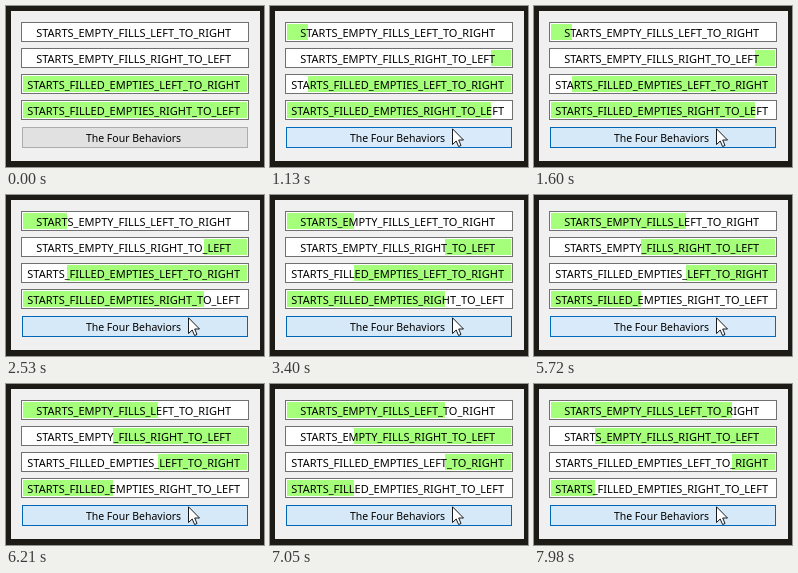
An HTML page for the animation above (8 s loop, 258 by 161 pixels).

```html
<!DOCTYPE html>
<html lang="en">
<head>
<meta charset="utf-8">
<title>The Four Behaviors</title>
<style>
html, body { margin: 0; width: 100%; height: 100%; overflow: hidden; background: #1d1b16; }
svg { display: block; width: 258px; height: 161px; }
text { font: 11px "Noto Sans", "Open Sans", sans-serif; text-anchor: middle; fill: #000; }
.label { font-size: 10.5px; }
</style>
</head>
<body>
<svg viewBox="0 0 258 161">
  <rect x="5" y="5" width="249" height="150" fill="#f0f0f0"/>
  <g id="bars"></g>
  <rect id="button" x="16.5" y="121.5" width="225" height="20"/>
  <text class="label" x="127.5" y="136">The Four Behaviors</text>
  <circle id="click" cx="183" cy="122" r="12" fill="#ff0" fill-opacity=".47"/>
  <path id="cursor" d="M.5 .8V16.5L4.2 13 6.6 18.5 9 17.5 6.7 12H11.5Z" fill="#fff" stroke="#000" stroke-width=".9"/>
</svg>
<script>
const LOOP = 8000, STEP = 80;
const PRESSES = [[510, 670], [1520, 1600], [2460, 2530], [3330, 3400], [4270, 4340],
                 [5200, 5260], [6120, 6210], [6980, 7050], [7910, 7980]];
const RELEASES = [1130, 2060, 3000, 3950, 4800, 5720, 6670, 7600];
const LEFT = 15, WIDTH = 228, INNER_LEFT = 17, INNER_RIGHT = 241;

// Each button look is [fill, border].
const NORMAL = [[225, 225, 225], [173, 173, 173]];
const HOVER = [[229, 241, 251], [0, 120, 215]];
const PRESSED = [[213, 233, 249], [0, 102, 184]];

// Each bar: label, and the span of its fill for a progress p.
const BARS = [
  ["STARTS_EMPTY_FILLS_LEFT_TO_RIGHT", p => [0, p]],
  ["STARTS_EMPTY_FILLS_RIGHT_TO_LEFT", p => [1 - p, 1]],
  ["STARTS_FILLED_EMPTIES_LEFT_TO_RIGHT", p => [p, 1]],
  ["STARTS_FILLED_EMPTIES_RIGHT_TO_LEFT", p => [0, 1 - p]]
];

const $ = id => document.getElementById(id);
const clamp = (v, lo, hi) => Math.min(hi, Math.max(lo, v));
const mix = (a, b, k) => "rgb(" + a.map((v, i) => Math.round(v + (b[i] - v) * k)) + ")";

$("bars").innerHTML = BARS.map(([label], i) => {
  const y = 16 + 26 * i;
  return `<rect x="15.5" y="${y + .5}" width="227" height="19" fill="#fff" stroke="#707070"/>
    <rect class="fill" y="${y + 2}" height="16" fill="#a6ff7a"/>
    <text x="127.7" y="${y + 15}">${label}</text>`;
}).join("");
const fills = document.querySelectorAll(".fill");

function drawBars(progress) {
  BARS.forEach(([, span], i) => {
    const [from, to] = span(progress)
      .map(s => clamp(Math.ceil(LEFT + WIDTH * s), INNER_LEFT, INNER_RIGHT));
    fills[i].setAttribute("x", from);
    fills[i].setAttribute("width", to - from);
  });
}

// The pointer slides in over four steps while the button lights up.
const arrival = t => clamp(Math.floor((t - 70) / 72.5) / 4, 0, 1);

function drawButton(t, released) {
  const pressed = PRESSES.filter(p => t >= p[0]).length;
  let from = HOVER, to = PRESSED, k;
  if (!pressed) {
    from = NORMAL;
    to = HOVER;
    k = arrival(t);
  } else if (pressed > released) {
    k = t < PRESSES[pressed - 1][1] ? .5 : 1;
  } else {
    k = clamp(.75 - Math.floor((t - RELEASES[released - 1]) / STEP) / 4, 0, 1);
  }
  $("button").setAttribute("fill", mix(from[0], to[0], k));
  $("button").setAttribute("stroke", mix(from[1], to[1], k));
}

function drawCursor(t) {
  const away = (1 - arrival(t)) ** 2;
  $("cursor").setAttribute("transform", `translate(${182 + 4 * away} ${122 + 26 * away})`);
  $("cursor").style.display = t < 70 ? "none" : "";
  $("click").style.display = PRESSES.some(([a, b]) => t >= a && t < b) ? "" : "none";
}

function frame() {
  const t = performance.now() % LOOP;
  const released = RELEASES.filter(r => t >= r).length;
  drawBars(released / 10);
  drawButton(t, released);
  drawCursor(t);
  requestAnimationFrame(frame);
}
frame();
</script>
</body>
</html>
```
